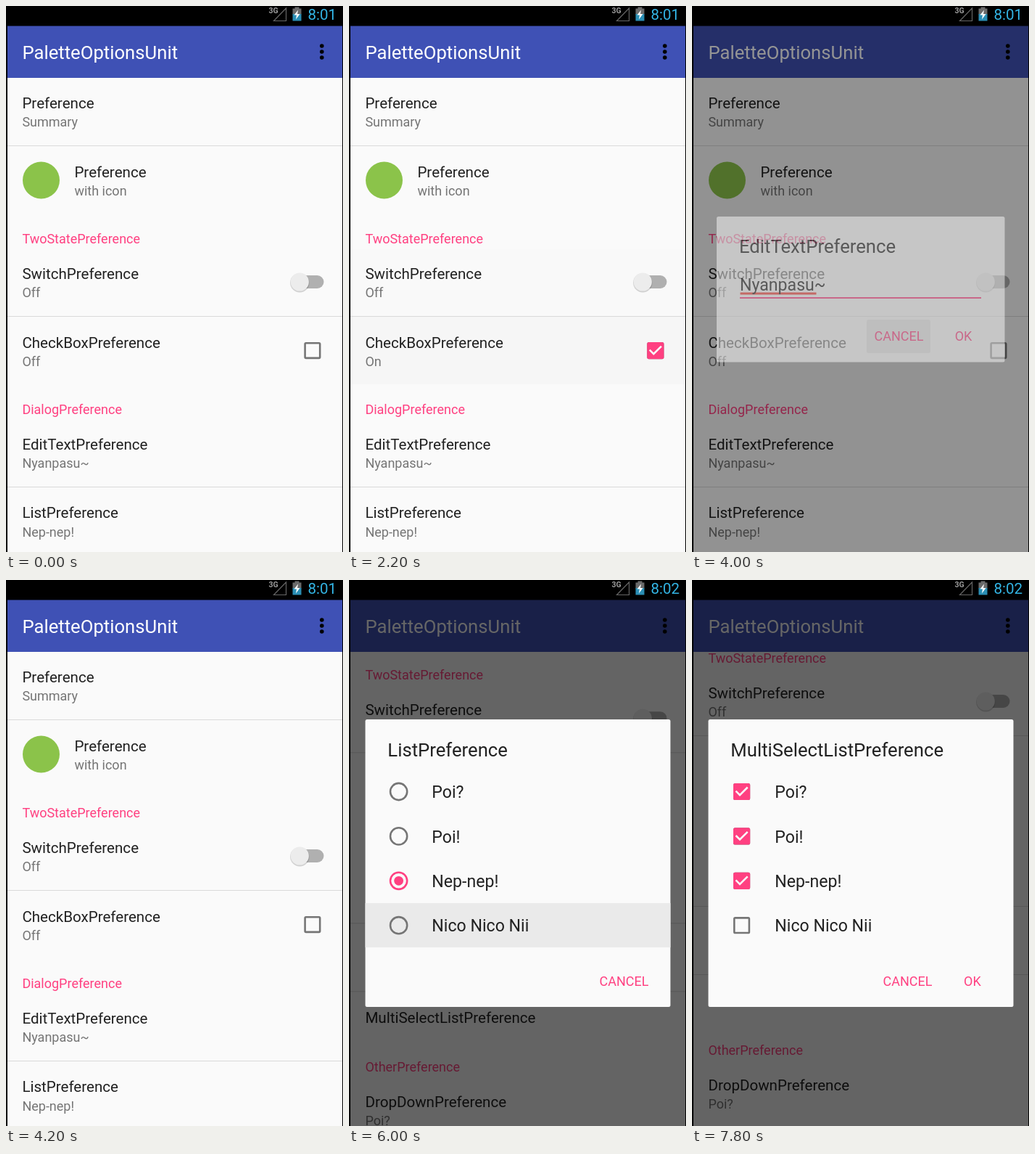
Recreate the animation shown at these times as an HTML page. Size 465 by 752 pixels, loop 8000 ms.

```html
<!DOCTYPE html>
<html lang="en">
<head>
<meta charset="utf-8">
<title>Preferences</title>
<style>
html, body { margin: 0; width: 100%; height: 100%; overflow: hidden; background: #000; }
svg { display: block; width: 465px; height: 752px; font-family: Roboto, "Noto Sans", sans-serif; }
.title { font-size: 20.57px; fill: #212121; }
.sum { font-size: 18px; fill: #757575; }
.head, .btn { font-size: 18px; fill: #ff4081; }
.big { font-size: 25.7px; fill: #212121; }
.item { font-size: 23.14px; fill: #212121; }
</style>
</head>
<body>
<svg id="stage" viewBox="0 0 465 752"></svg>
<script>
const PINK = '#ff4081', GREY = '#757575', LEFT = 22.4;
const CHOICES = ['Poi?', 'Poi!', 'Nep-nep!', 'Nico Nico Nii'];

const text = (cls, x, y, s, id = '') => `<text class="${cls}" x="${x}" y="${y}" id="${id}">${s}</text>`;
const rect = (x, y, w, h, fill, more = '') =>
  `<rect x="${x}" y="${y}" width="${w}" height="${h}" fill="${fill}" ${more}/>`;
const row = (y, title, sum, id, x = LEFT) => text('title', x, y, title) + text('sum', x, y + 25.2, sum, id);
const divider = y => rect(2, y, 462, 1, '#dadada');
const press = (y, id) => rect(2, y, 462, 93, '#000', `id="${id}" opacity="0"`);

const checkbox = (cx, cy, id) => `<g transform="translate(${cx} ${cy})">
  <rect x="-10.3" y="-10.3" width="20.6" height="20.6" rx="1.3" fill="none" stroke="${GREY}" stroke-width="2.57"/>
  <g id="${id}"><rect x="-11.6" y="-11.6" width="23.2" height="23.2" rx="2.5" fill="${PINK}"/>
  <path d="M-8.1 -.9L-2.6 4.6L8.1 -6" fill="none" stroke="#fafafa" stroke-width="2.57"/></g></g>`;

const radio = (cx, cy, id) => `<g id="${id}" stroke="${GREY}" fill="${PINK}">
  <circle cx="${cx}" cy="${cy}" r="11.6" fill="none" stroke-width="2.57"/>
  <circle cx="${cx}" cy="${cy}" r="6.4" stroke="none"/></g>`;

const choiceY = i => 291.5 + i * 61.4;
const choiceDialog = (id, title, control, extra, buttons) => `<g id="${id}">
  ${rect(22.5, 192, 421, 396, '#fafafa', 'rx="2.5"')}${extra}
  ${text('big', 53.3, 243, title)}
  ${CHOICES.map((s, i) => control(68.6, choiceY(i), id + i) + text('item', 114.3, choiceY(i) + 8.6, s)).join('')}
  ${buttons}</g>`;

document.getElementById('stage').innerHTML = `
${rect(0, 0, 465, 752, '#000')}
<clipPath id="page">${rect(2, 99, 462, 653, '#000')}</clipPath>
<g clip-path="url(#page)">
  ${rect(2, 99, 462, 653, '#fafafa')}
  <g id="list">
    ${press(334, 'pressSwitch') + press(428, 'pressCheck') + press(663, 'pressList')}
    ${row(141, 'Preference', 'Summary', '')}${divider(192)}
    <circle cx="48.5" cy="240" r="25.5" fill="#8bc34a"/>
    ${row(235.6, 'Preference', 'with icon', '', 94.4)}
    ${text('head', LEFT, 327.2, 'TwoStatePreference')}
    ${row(376, 'SwitchPreference', 'Off', 'switchSum')}${divider(427)}
    <rect id="track" x="397" y="371" width="41.5" height="18" rx="9"/>
    <circle id="shade" cy="381.2" r="13.2" fill="#000" opacity=".16"/>
    <circle id="thumb" cy="380" r="12.6"/>
    ${row(470.6, 'CheckBoxPreference', 'Off', 'checkSum')}
    ${checkbox(422.9, 474.6, 'check')}
    ${text('head', LEFT, 562.2, 'DialogPreference')}
    ${row(611, 'EditTextPreference', 'Nyanpasu~', '')}${divider(662)}
    ${row(705.4, 'ListPreference', 'Nep-nep!', 'listSum')}${divider(756)}
    ${text('title', LEFT, 799.8, 'MultiSelectListPreference')}
    ${text('head', LEFT, 867.2, 'OtherPreference')}
    ${row(915.8, 'DropDownPreference', 'Poi?', '')}
  </g>
  <ellipse id="glow" cx="233" cy="764" rx="250" ry="32"/>
</g>
${rect(2, 27.5, 462, 71.5, '#3f51b5')}
<text class="big" x="${LEFT}" y="72.6" style="fill:#fff">PaletteOptionsUnit</text>
${[55, 63, 71].map(y => `<circle cx="435.8" cy="${y}" r="2.8"/>`).join('')}
<text x="362.5" y="9.8" font-size="10.5" font-weight="700" fill="#9a9a9a">3G</text>
<path d="M369.5 20.5H386.5V3Z" fill="none" stroke="#666" stroke-width="1.2"/>
${rect(398.5, 1.5, 6, 3, '#6b6b6b') + rect(395.5, 3.5, 12, 8, '#6b6b6b') + rect(395.5, 11, 12, 9.5, '#2b8fb5')}
<path d="M403 5.5L397.5 12.5H401L400 18.5L405.5 11H402Z" fill="#fff"/>
<text id="clock" x="416.4" y="19.3" font-size="20.6" fill="#33b5e5"></text>
<rect id="dim" x="2" y="27" width="462" height="725"/>
<g id="edit">
  ${rect(34, 290, 397.5, 200.5, '#fafafa', 'rx="2.5"')}
  ${text('big', 64.9, 340.4, 'EditTextPreference')}
  ${rect(66, 401, 333, 2, PINK) + rect(66.5, 394.5, 105, 3, '#f4443c')}
  ${text('item', 66, 392.2, 'Nyanpasu~')}
  ${rect(66, 367, 3, 31, PINK, 'id="caret"')}
  ${rect(241, 432, 88, 46, '#000', 'rx="2.5" id="pressCancel"')}
  ${text('btn', 251.5, 461.4, 'CANCEL') + text('btn', 362.7, 461.4, 'OK')}
</g>
${choiceDialog('one', 'ListPreference', radio,
  rect(22.5, 445, 421, 61, '#eaeaea', 'id="pressItem"'), text('btn', 345.5, 559.2, 'CANCEL'))}
${choiceDialog('many', 'MultiSelectListPreference', checkbox, '',
  text('btn', 263.5, 559.2, 'CANCEL') + text('btn', 375, 559.2, 'OK'))}`;

const el = {};
document.querySelectorAll('[id]').forEach(e => { if (e.id) el[e.id] = e; });
const set = (id, attr, v) => el[id].setAttribute(attr, v);
const fade = (id, v) => set(id, 'opacity', v);
const label = (id, s) => { if (el[id].textContent !== s) el[id].textContent = s; };

// Holds `first`, then takes one value per 100 ms after each start time.
function steps(t, first, ...runs) {
  let v = first;
  for (const [start, ...vals] of runs)
    if (t >= start) v = vals[Math.min(vals.length - 1, Math.floor((t - start) / 100))];
  return v;
}
const within = (t, a, b) => t >= a && t < b;

function draw(t) {
  const on = steps(t, 0, [1000, .35, .85, 1], [1600, 1, .6, .12, 0]);
  const x = 405.3 + 25.5 * on;
  set('thumb', 'cx', x);
  set('shade', 'cx', x);
  set('thumb', 'fill', on > .5 ? PINK : '#ececec');
  set('track', 'fill', on > .5 ? '#fda6c3' : '#b0b0b0');
  label('switchSum', within(t, 1000, 1600) ? 'On' : 'Off');
  fade('pressSwitch', steps(t, 0, [1600, .06, .04, .02, .005], [2600, 0]));

  const checked = within(t, 2100, 2600);
  fade('check', +checked);
  label('checkSum', checked ? 'On' : 'Off');
  fade('pressCheck', steps(t, 0, [2100, .04, .014], [2600, .035, 0]));

  const scroll = steps(t, 0, [4500, 55, 125, 172, 189.7], [6600, 213]);
  set('list', 'transform', `translate(0 ${-scroll})`);
  label('clock', t < 4600 ? '8:01' : '8:02');
  fade('glow', steps(t, 0, [6600, .015, .05, .045, .03, .015, 0]));

  fade('dim', steps(t, 0, [3200, .41, .6], [3900, .6, .42, .15, 0],
    [5100, 0, .41, .6], [6000, .6, .42, .15, 0], [7300, .41, .6]));
  fade('edit', steps(t, 0, [3200, .95, 1], [3900, 1, .5, 0]));
  fade('caret', +(t < 3600));
  fade('pressCancel', t >= 3900 ? .06 : 0);

  fade('pressList', steps(t, 0, [5100, .06, .04, 0]));
  fade('one', steps(t, 0, [5200, .95, 1], [6000, 1, .5, 0]));
  fade('pressItem', +(t >= 6000));
  label('listSum', t < 6100 ? CHOICES[2] : CHOICES[3]);
  const picked = t < 6100 ? 2 : 3;
  CHOICES.forEach((_, i) => {
    set('one' + i, 'stroke', i === picked ? PINK : GREY);
    el['one' + i].lastElementChild.setAttribute('opacity', +(i === picked));
    fade('many' + i, +(i < (t < 7800 ? 2 : 3)));
  });
  fade('many', steps(t, 0, [7300, .95, 1]));
}

const began = performance.now();
function tick() {
  draw((performance.now() - began) % 8000);
  requestAnimationFrame(tick);
}
tick();
</script>
</body>
</html>
```
